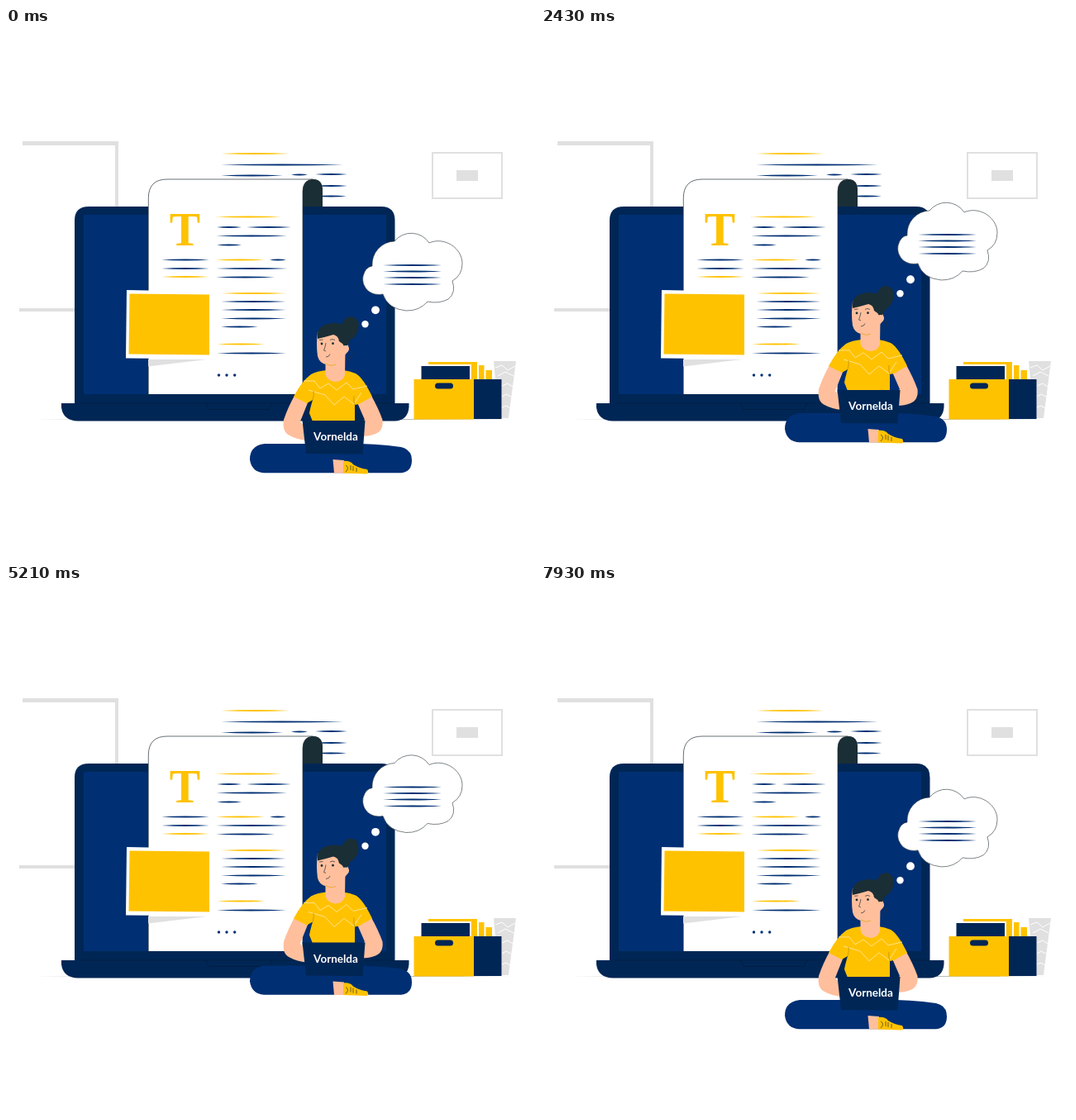
Write an HTML page that moves like this. It is 640 px wide and 640 px high and loops after 8000 ms.

```html
<!DOCTYPE html>
<html lang="en">
<head>
<meta charset="utf-8">
<title>Writer</title>
<style>
html, body { margin: 0; height: 100%; overflow: hidden; background: #fff; }
svg { display: block; width: 100vw; height: 100vh; }
.grey { fill: #e0e0e0; }
.navy { fill: #002655; }
.blue { fill: #002f73; }
.gold { fill: #ffc200; }
.dark { fill: #1a2e35; }
.skin { fill: #ffbf9d; }
.white { fill: #fff; }
.thin { fill: none; stroke: #263238; stroke-width: .7; }
.zig { fill: none; stroke: #ffe69a; stroke-width: .9; }
</style>
</head>
<body>
<svg viewBox="0 0 640 640">
  <!-- wall -->
  <g class="grey">
    <path d="M20 137H136V217H132V142H20zM16 339H84V343H16z"/>
    <path d="M515 150H601V207H515zM517 152V205H599V152z" fill-rule="evenodd"/>
    <path d="M545 172H571V185H545z"/>
  </g>
  <path d="M36 473.5L320 472.8L615 473.5L320 474.2z" fill="#8d9498"/>
  <g id="back"></g>

  <!-- laptop -->
  <path class="dark" d="M358 220V196Q358 183 371 183Q383 183 383 196V220z"/>
  <path class="navy" d="M83 456V233Q83 216 100 216H454Q470.500 216 470.500 233V456z"/>
  <path class="blue" d="M94 226H460V443H94z"/>
  <path class="navy" d="M67 454H487.500V459Q486 475 470 475.500H87Q69 475 67 459z"/>
  <path class="thin" style="stroke:#001a3d" d="M90 454H470M242 454L245 461.500H318L322 454"/>
  <path class="dark" d="M358.500 216V196Q359 183 371 183Q382.500 183 382.500 196V216z"/>

  <!-- page -->
  <path class="white" d="M172 443V206Q172 183 195 183H371Q359 184 359 198V443z"/>
  <path class="thin" d="M172.300 443V206Q172.300 183 195 183H371Q359 184 359 198V443"/>
  <path class="grey" d="M172 401H243L172 409.500z"/>
  <path class="white" d="M146 317L247 319V400.500L145 399.500z"/>
  <path class="gold" d="M149.500 321.500L246 322.500V395.500L148.500 394.500z"/>
  <text class="gold" x="216.500" y="263" font-size="56" font-weight="700" text-anchor="middle" font-family="'Liberation Serif', serif">T</text>
  <g id="page"></g>
  <g class="blue"><circle cx="257.500" cy="420" r="1.700"/><circle cx="267" cy="420" r="1.700"/><circle cx="276.700" cy="420" r="1.700"/></g>

  <!-- box and cup -->
  <path class="grey" d="M590 403H617L608 472H599V425H592z"/>
  <path fill="none" stroke="#fff" stroke-width="1" d="M592 411L600 408L607 414L616 409M595 421L604 416L614 421M600 433L607 430L613 434M600 446L605 443L611 446M600 459L605 457L610 460"/>
  <path class="gold" d="M511 404H570V425H563V407H511zM572 408H578.500V425H572zM580.500 414H588V425H580.500z"/>
  <path class="navy" d="M566 425H599.500V473H566z"/>
  <path class="gold" d="M493.500 425H566V473.500H493.500z"/>
  <path class="navy" d="M502.500 409H561V425H502.500z"/>
  <rect class="navy" x="519" y="429.500" width="22" height="7" rx="3.500"/>

  <g id="mover">
    <!-- thought bubble -->
    <path class="white" style="stroke:#263238;stroke-width:.6" d="M443 288A28 28 0 0 1 470 258A26 26 0 0 1 512 260C530 252 552 266 552 285Q552 299 540 306Q545 320 535 328Q524 334 510 331Q500 342.500 484 342Q462 340 456 322Q446 324 438 318Q430 310 432 300Q435 289 443 288z"/>
    <g id="thought"></g>
    <circle class="white" cx="447" cy="341.300" r="4.900"/>
    <circle class="white" cx="434.500" cy="358.300" r="4.200"/>

    <!-- legs -->
    <path class="blue" d="M313 503Q295 505 295 522Q297 537 312 538.300H478Q491 537 491 523Q491 510 478 507Q440 502 400 503z"/>
    <path class="skin" d="M395.500 522L409 523V538.500H397z"/>
    <path class="gold" d="M408 524Q416 523 420 528Q428 533 437 534Q440 539 436 539.500L408 538.500z"/>
    <path class="thin" d="M411 529Q416 532 411 537M417 529V535M420 530V536M424 532V537"/>

    <!-- arms -->
    <path class="skin" d="M350 443Q341 459 336 474Q334 489 343 493Q352 498 364 499V482Q357 479 356 476L366 451z"/>
    <path class="skin" d="M441 443Q451 461 455.500 474Q457 487 447 491Q440 494 430 494V478L434 474L424 451z"/>

    <!-- shirt and neck -->
    <path class="gold" d="M388 414Q376 415 369 419Q358 427 348 446L364 454L371 450Q368 460 367 466L371 476H422L422 456L427 455L443 446Q432 423 423 418Q416 415 408 414z"/>
    <path class="skin" d="M386.500 400L410.500 388L410 420Q407 428 398 428Q389 427 386.500 419z"/>
    <path class="zig" d="M360 427L373 427L380 436L390 430L400 438L412 429L420 437L437 433M366 438L386 444L397 456L409 446L421 455L430 441"/>
    <path class="thin" style="stroke:#b88b00" d="M371 450Q373 444 372 439M422 456Q420 450 421 445"/>

    <!-- head -->
    <path class="dark" d="M406 360Q409 349 418 349Q427 351 426.500 360Q427 367 422 373Q417 380 410 376z"/>
    <path class="skin" d="M377 368Q375 382 377 397Q379 405 387 407Q401 407 408 398L414 391V370L400 363z"/>
    <path class="dark" d="M377 376Q375 362 388 358.500Q400 355 410 360Q418 366 416 378Q415 383 411 386L409 385Q407 381 403 379Q402 372 396 371Q386 374 377 376z"/>
    <circle class="skin" cx="411" cy="388" r="4"/>
    <path class="thin" d="M379 377.500L383.500 377M392 377.500Q395 375.500 398 377.500M387 381Q386 387 384.500 390L387 391M387 398Q391 398 392 394.500M420 352Q424 363 416 375M418 390Q420 396 414 404"/>
    <path class="thin" style="stroke:#e0a600" d="M387 406Q393 410 399 407"/>
    <g class="dark"><circle cx="382" cy="382" r="1.400"/><circle cx="395.500" cy="381.700" r="1.400"/></g>

    <!-- small laptop -->
    <path class="navy" d="M358.500 474.500L369 475H434.500L431.500 515.500L363 515z"/>
    <text class="white" x="399" y="499" font-size="13.500" font-weight="700" text-anchor="middle" font-family="Lato, sans-serif">Vornelda</text>
  </g>
</svg>
<script>
const byId = id => document.getElementById(id);

// A text stroke that tapers at both ends.
function line(id, x1, x2, y, cls = "blue") {
  const m = (x1 + x2) / 2;
  byId(id).insertAdjacentHTML("beforeend",
    `<path class="${cls}" d="M${x1} ${y}Q${m} ${y - 2} ${x2} ${y}Q${m} ${y + 2} ${x1} ${y}z"/>`);
}

line("back", 260, 343, 152, "gold");
line("back", 260, 408, 165.5);
line("back", 260, 335, 178.5);
line("back", 345, 365, 177.5);
line("back", 374, 413, 177);
line("back", 374, 413, 191);
line("back", 374, 412, 203.5);

line("page", 253, 333, 228.5, "gold");
line("page", 255, 285, 241);
line("page", 291, 345, 241);
line("page", 254, 340, 251.5);
line("page", 255, 285, 262.5);
line("page", 188, 246, 280.5);
line("page", 188, 246, 291);
line("page", 188, 246, 301, "gold");
line("page", 254, 313, 280.5, "gold");
line("page", 319, 339, 280.5);
line("page", 254, 341, 291);
line("page", 254, 325, 301.5);
line("page", 260, 339, 321, "gold");
for (const y of [331, 341, 351.5]) line("page", 260, 339, y);
line("page", 260, 305, 361.5);
line("page", 255, 313, 382.5, "gold");
line("page", 255, 339, 393.5);

for (const y of [287, 294.5, 302, 310]) line("thought", 456, 527, y);

// The writer rises and sinks at an even pace, stepped at 14 per second.
const LOOP = 8000, RISE = 61, FPS = 14;
function draw() {
  const step = Math.floor((performance.now() + 5) * FPS / 1000);
  const t = step * 1000 / FPS % LOOP;
  const dy = -RISE * (1 - Math.abs(1 - t / (LOOP / 2)));
  byId("mover").setAttribute("transform", `translate(0 ${dy.toFixed(2)})`);
  requestAnimationFrame(draw);
}
draw();
</script>
</body>
</html>
```
